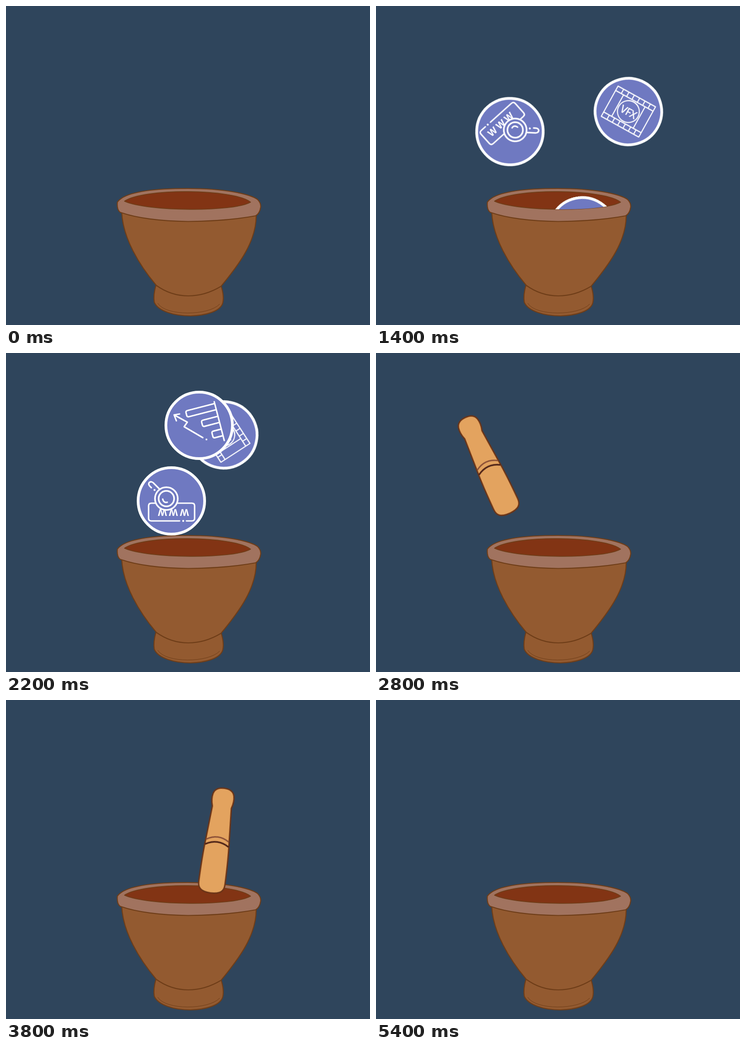
Recreate the animation shown at these times as an HTML page without scripts. Size 799 px wide and 701 px high, loop 5.5 s.

```html
<!DOCTYPE html>
<html lang="en">
<head>
<meta charset="utf-8">
<title>Mortar</title>
<style>
html, body { margin: 0; width: 100%; height: 100%; overflow: hidden; background: #2f455c; }
svg { display: block; width: 100vw; height: 100vh; }
.icon { fill: none; stroke: #fff; stroke-width: 3.2; stroke-linecap: round; stroke-linejoin: round; }
.fine { stroke-width: 2.3; }
.disc, .solid { fill: #6f79c1; }
.disc { stroke-width: 6; }
.dot { fill: #fff; stroke: none; }
.icon text { fill: #fff; stroke: none; text-anchor: middle; }
.clay { stroke: #6e3d18; stroke-width: 2.2; stroke-linejoin: round; }

/* Motion runs at ten poses per second: steps(n) lasts n tenths */
.move { animation: 5.5s steps(1) infinite; }
#palette { animation-name: palette; }
#monitor { animation-name: monitor; }
#flask { animation-name: flask; }
#web1 { animation-name: web1; }
#web2 { animation-name: web2; }
#film1 { animation-name: film1; }
#film2 { animation-name: film2; }
#chart { animation-name: chart; }
#pestle { animation-name: pestle; }

@keyframes palette {
  0% { transform: translate(141px, -90px) rotate(-60deg); }
  3.63% { transform: translate(141px, -80px) rotate(-60deg); animation-timing-function: steps(4); }
  10.9% { transform: translate(187px, 150px) rotate(-12deg); }
  12.72% { transform: translate(209px, 204px); animation-timing-function: steps(6); }
  23.63%, 100% { transform: translate(370px, 540px) rotate(72deg); }
}
@keyframes monitor {
  0% { transform: translate(735px, -90px) rotate(-66deg); }
  1.81% { transform: translate(718px, -20px) rotate(-66deg); animation-timing-function: steps(5); }
  10.9% { transform: translate(636px, 181px) rotate(-11deg); }
  12.72% { transform: translate(614px, 221px); animation-timing-function: steps(7); }
  25.45% { transform: translate(453px, 494px) rotate(78deg); animation-timing-function: steps(2); }
  29.09%, 100% { transform: translate(405px, 572px) rotate(100deg); }
}
@keyframes flask {
  0% { transform: translate(195px, -90px) rotate(-10deg); }
  12.72% { transform: translate(223px, -20px); animation-timing-function: steps(7); }
  25.45%, 100% { transform: translate(440px, 540px) rotate(80deg); }
}
@keyframes web1 {
  0%, 16.36% { transform: translate(190px, -80px) rotate(-102deg); animation-timing-function: steps(3); }
  21.81% { transform: translate(240px, 130px) rotate(-66deg); animation-timing-function: steps(2); }
  25.45% { transform: translate(294px, 276px) rotate(-42deg); animation-timing-function: steps(3); }
  30.9%, 100% { transform: translate(380px, 540px) rotate(0deg); }
}
@keyframes film1 {
  0% { transform: translate(660px, -90px) rotate(90deg); }
  14.54% { transform: translate(636px, -20px) rotate(90deg); animation-timing-function: steps(6); }
  25.45% { transform: translate(554px, 232px) rotate(29deg); animation-timing-function: steps(7); }
  38.18%, 100% { transform: translate(405px, 535px) rotate(-45deg); }
}
@keyframes web2 {
  0% { transform: translate(240px, -90px) rotate(130deg); }
  32.72% { transform: translate(258px, 0px) rotate(130deg); animation-timing-function: steps(4); }
  39.99% { transform: translate(363px, 325px) rotate(180deg); animation-timing-function: steps(2); }
  43.63% { transform: translate(394px, 450px) rotate(204deg); }
  45.45%, 100% { transform: translate(408px, 540px) rotate(216deg); }
}
@keyframes film2 {
  0% { transform: translate(664px, -90px) rotate(130deg); }
  27.27% { transform: translate(645px, -60px) rotate(130deg); animation-timing-function: steps(3); }
  32.72% { transform: translate(571px, 40px) rotate(100deg); animation-timing-function: steps(4); }
  39.99% { transform: translate(478px, 180px) rotate(57deg); animation-timing-function: steps(2); }
  43.63% { transform: translate(437px, 260px) rotate(36deg); }
  45.45% { transform: translate(425px, 380px) rotate(24deg); }
  47.27%, 100% { transform: translate(415px, 560px); }
}
@keyframes chart {
  0%, 27.27% { transform: translate(440px, -80px) rotate(80deg); animation-timing-function: steps(7); }
  39.99% { transform: translate(424px, 159px); animation-timing-function: steps(2); }
  43.63% { transform: translate(418px, 207px) rotate(-22deg); }
  45.45% { transform: translate(410px, 350px) rotate(-33deg); }
  47.27%, 100% { transform: translate(400px, 560px) rotate(-44deg); }
}
@keyframes pestle {
  0% { transform: translate(-300px, 0); }
  50.9% { transform: translate(294px, 352px) rotate(-25deg); animation-timing-function: steps(3); }
  56.36% { transform: translate(469px, 428px) rotate(17deg); animation-timing-function: steps(4); }
  63.63% { transform: translate(346px, 436px) rotate(-9deg); animation-timing-function: steps(3); }
  69.09% { transform: translate(449px, 424px) rotate(7.500deg); }
  70.9% { transform: translate(458px, 430px) rotate(9deg); animation-timing-function: steps(3); }
  76.36% { transform: translate(346px, 436px) rotate(-9deg); animation-timing-function: steps(3); }
  81.81% { transform: translate(464px, 424px) rotate(9deg); animation-timing-function: steps(2); }
  85.45% { transform: translate(468px, 428px) rotate(12deg); animation-timing-function: steps(4); }
  92.72% { transform: translate(350px, 434px) rotate(-17deg); }
  94.54% { transform: translate(291px, 352px) rotate(-31deg); }
  98.18%, 100% { transform: translate(-300px, 0); }
}
</style>
</head>
<body>
<svg viewBox="0 0 799 701" preserveAspectRatio="none">
  <defs>
    <!-- everything above the front lip of the bowl -->
    <clipPath id="mouth">
      <path d="M0 0H799V431H537C500 453 310 452 260 429H0Z"/>
    </clipPath>
    <circle id="disc" class="disc" r="73"/>

    <g id="web" class="icon">
      <use href="#disc"/>
      <path d="M-18 -44H44Q50 -44 50 -38V-11Q50 -5 44 -5H-45Q-51 -5 -51 -11V-38Q-51 -44 -45 -44H-33"/>
      <circle class="dot" cx="-26" cy="-44" r="2.200"/>
      <text x="-3" y="-18" font-family="Inter, Arial, sans-serif" font-size="20" font-weight="700" letter-spacing="3">WWW</text>
      <circle class="solid" cx="11" cy="5" r="25" stroke-width="3.600"/>
      <circle cx="11" cy="5" r="17" stroke-width="3.600"/>
      <path d="M9 -3Q17 -5 19 4M26 26L40 40Q45 44 49 40Q51 36 47 32L44 29"/>
      <circle class="dot" cx="37" cy="24" r="2.200"/>
    </g>

    <g id="film" class="icon fine">
      <use href="#disc"/>
      <path d="M-47 -38H47V38H-47ZM-47 -27H47M-47 27H47M-27 -27V27M27 -27V27"/>
      <path d="M-34 -32.500H45M-34 32.500H45" stroke-width="11" stroke-linecap="butt" stroke-dasharray="2.3 11.100"/>
      <circle class="solid" r="24"/>
      <text y="8.500" font-family="'Open Sans', Arial, sans-serif" font-size="23" font-weight="600" letter-spacing="-1.500">VFX</text>
    </g>
  </defs>

  <rect width="799" height="701" fill="#2f455c"/>

  <g class="clay">
    <path fill="#935a30" d="M329 614Q323 635 325.500 651C334 671 370 681 405 681C440 680 468 671 475 655Q480 640 472 614Z"/>
    <path fill="none" stroke-width="1" d="M333 653C350 682 445 681 469 655"/>
    <path fill="#935a30" d="M254 452C256 510 293 570 330 614Q362 637 400 637Q437 637 472 616C510 570 552 515 549 456Z"/>
    <path fill="#a1735f" d="M244.500 431C260 409 320 401 399 401C480 401 535 413 552 425Q560 433 559 442Q557 456 548 461C500 470 450 473 400 473.500C340 473 285 466 250 453Q243 447 244.500 431Z"/>
    <path fill="#823414" stroke-width="1.600" d="M260 429C300 400 500 401 537 431C500 453 310 452 260 429Z"/>
  </g>

  <g clip-path="url(#mouth)">
    <g id="flask" class="move icon">
      <use href="#disc"/>
      <g stroke-width="3.800">
        <path d="M10 -40L2 -12L-51 25Q-60 37 -47 43Q-15 53 10 50Q18 48 20 40L28 -4L38 -32M4 -43L45 -30M-28 10Q-4 18 23 12"/>
      </g>
      <g class="dot">
        <circle cx="-11" cy="33" r="4.500"/>
        <circle cx="2" cy="30" r="4.500"/>
        <circle cx="-15" cy="21" r="4.500"/>
      </g>
    </g>

    <g id="palette" class="move icon">
      <use href="#disc"/>
      <path d="M-12 -22C-17 -26 -12 -39 -24 -39C-42 -35 -50 -12 -50 5C-50 35 -25 55 0 55C30 55 51 32 51 5C51 -17 33 -31 13 -26"/>
      <circle cx="-29" cy="-15" r="6.500"/>
      <circle cx="35" cy="-3" r="6.500"/>
      <circle cx="31" cy="22" r="6.500"/>
      <circle cx="13" cy="38" r="6.500"/>
      <circle cx="-11" cy="37" r="6.500"/>
      <path d="M-4 21Q18 23 19 2"/>
      <circle class="dot" cx="12" cy="-8" r="2"/>
      <path class="solid" d="M-9 -14L14 -53Q20 -61 22 -55Q22 -45 2 -7L-10 11C-11 22 -20 26 -29 27C-26 20 -28 8 -18 3ZL2 -7M-18 3L-10 11"/>
    </g>

    <g id="monitor" class="move icon fine">
      <use href="#disc"/>
      <path d="M-22 -54L39 -41Q44 -39 43 -34L20 52Q18 57 13 55L-45 41Q-50 39 -48 34L-30 -42M32 -42L24 -12M22 -4L8 53M-26 -36L-42 34L5 46L25 -33L-8 -40"/>
      <path d="M28 -3L43 1M25 14L40 18M48 -7L54 -5L45 33L39 31Z"/>
      <path d="M-10 8L-11 -6L-3 1L1 -15L6 -4L19 -13M-4 -39L0 -31L10 -26L24 -33"/>
      <circle cx="-11" cy="-34" r="5"/>
      <path class="solid" d="M-28 3L7 9L3 40L-35 34ZM-29 10L5 16"/>
      <path d="M-14 17L-17 32M-3 19L-6 34M-24 18L-27 30"/>
      <circle class="solid" cx="-15" cy="25" r="3"/>
      <circle class="solid" cx="-4" cy="22" r="3"/>
      <path class="solid" d="M-35 -49L-25 -55L-7 -23L-7 -11L-17 -17ZM-31 -42L-21 -48M-17 -17L-7 -23"/>
    </g>

    <use id="web1" class="move" href="#web"/>
    <use id="film1" class="move" href="#film"/>
    <use id="film2" class="move" href="#film"/>
    <use id="web2" class="move" href="#web"/>

    <g id="chart" class="move icon">
      <use href="#disc"/>
      <path transform="rotate(-14.500)" d="M45 -42V46M45 -38H-17Q-21 -38 -21 -34V-28Q-21 -24 -17 -24H45M45 -9H11Q7 -9 7 -5V1Q7 5 11 5H45M45 20H27Q23 20 23 24V31Q23 35 27 35H45"/>
      <path d="M-43 -25L-55 -23L-50 -10M-55 -23L-26 -7L-33 3L8 27"/>
      <circle class="dot" cx="16" cy="31" r="2"/>
    </g>

    <g id="pestle" class="move" fill="none" stroke="#6b3417" stroke-width="3">
      <path fill="#e3a35f" d="M0 0C-22 0 -29 -8 -29 -22C-29 -60 -28 -90 -26 -115L-21 -190Q-26 -205 -23 -218Q-19 -232 0 -232Q19 -232 23 -218Q26 -205 21 -190L26 -115C28 -90 29 -60 29 -22C29 -8 22 0 0 0Z"/>
      <path stroke="#8a4f36" stroke-width="3.200" d="M-25 -116Q0 -132 25 -116"/>
      <path stroke="#4f2418" stroke-width="3.400" d="M-26 -105Q0 -121 26 -105"/>
    </g>
  </g>
</svg>
</body>
</html>
```
